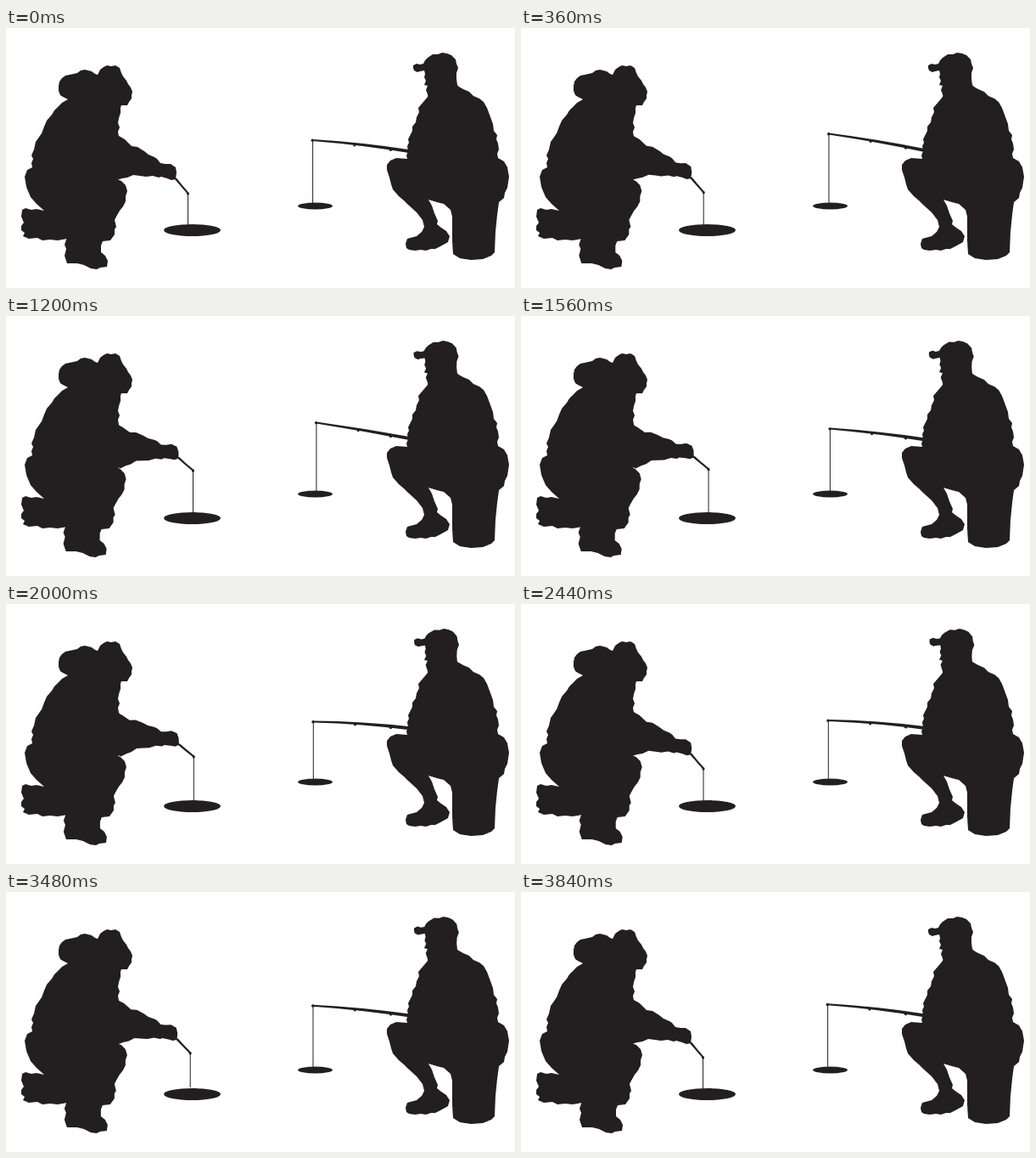
Animation, 600 px wide and 306 px high, one loop 3880 ms. Source, as an HTML page:

```html
<!DOCTYPE html>
<html lang="en">
<head>
<meta charset="utf-8">
<title>Ice fishing</title>
<style>
html, body { margin: 0; width: 100%; height: 100%; overflow: hidden; background: #fff; }
svg { display: block; width: 600px; height: 306px; fill: #231f20; }
.line { stroke: #231f20; stroke-width: 1; }
</style>
</head>
<body>
<svg viewBox="0 0 600 306">
  <ellipse cx="219.5" cy="238" rx="33.5" ry="7"/>
  <ellipse cx="364.5" cy="209.5" rx="20.5" ry="4"/>

  <!-- kneeling angler -->
  <polygon points="62,68 63,63 66,59 70,56 75,55 84,53 88,50 93,49 101,51 105,54 108,55 111,49 115,46 119,44 124,45 129,44 134,47 136,53 138,57 142,62 144,66 147,70 149,75 148,79 148,83 145,87 143,91 136,91 135,94 135,100 133,106 132,112 134,117 132,122 133,128 139,134 142,150 139,166 132,175 133,190 60,220 45,215 36,207 29,199 26,192 24,187 22,175 25,167 31,164 30,159 32,154 30,150 33,143 35,134 42,124 45,116 48,109 54,102 57,97 66,88 73,84 67,81 64,79 62,74"/>
  <polygon id="leg" points="70,190 131,178 136,180 141,185 143,192 141,198 141,204 138,210 134,215 130,222 128,226 130,234 128,237 128,243 123,250 114,251 112,256 112,264 117,268 120,274 119,281 111,282 107,284 100,283 92,279 84,277 72,277 69,268 71,260 69,255 72,246"/>
  <polygon points="45,215 36,213 30,214 23,212 19,214 18,222 21,229 18,233 18,238 22,241 20,245 27,248 37,247 43,250 52,249 61,250 72,248 85,250 94,230 75,195"/>
  <g id="arm">
    <polygon points="128,124 133,127 140,131 146,137 148,139 155,140 163,145 168,149 175,152 178,154 182,159 188,160 194,160 200,164 201,170 200,178 195,179 190,177 183,175 180,176 173,174 165,175 158,174 150,173 143,176 137,177 130,179 118,170 119,140"/>
    <path d="M198.5 177.5L201 176.5L207.6 184.8L215.5 194L214 195.6L206.3 186.6Z"/>
    <circle cx="214.5" cy="195" r="1.6"/>
  </g>
  <line id="lineA" class="line"/>

  <!-- seated angler -->
  <path id="rod"/>
  <circle id="ringA" r="1.5"/>
  <circle id="ringB" r="1.8"/>
  <circle id="tip" r="1.7"/>
  <line id="lineB" class="line"/>
  <polygon id="head" points="480,47 480,44 484,42 488,43 492,42 494,38 497,35 503,31 509,31 514,29 520,30 525,32 530,37 531,42 533,47 531,53 531,60 532,67 536,72 530,86 500,86 497,78 495,73 497,68 493,67 495,62 493,58 494,54 493,50 488,51 485,52 481,50"/>
  <polygon points="498,77 497,81 492,87 486,94 487,99 484,105 483,111 479,116 479,121 476,127 474,131 475,135 473,139 474,145 472,150 473,154 530,190 586,190 591,164 587,157 580,153 579,148 581,143 580,136 578,131 579,126 575,121 574,113 570,102 567,94 563,87 558,83 551,80 546,75 539,72 532,68 515,68"/>
  <polygon points="473,154 460,153 453,156 449,161 449,167 452,176 454,184 456,190 463,198 469,203 474,208 484,217 491,226 493,234 490,240 484,245 473,248 471,254 472,259 475,261 482,262 489,261 495,262 501,260 506,260 512,257 521,252 523,245 519,239 513,235 508,231 509,227 505,218 502,209 498,202 508,205 516,207 524,214 526,222 526,250 527,266 535,271 548,273 562,272 572,268 576,264 577,240 579,220 581,205 587,200 588,194 591,188 593,175 591,164 570,145 500,135"/>
</svg>
<script>
const LOOP = 3880, STEP = 40;
const times = [0, 680, 1200, 2000, 2440, 3120, LOOP];
const armAngle = [0, -2.7, -8.9, -10.4, -0.7, -6.8];
const lineEnd = [232, 232, 232, 232, 232, 228];
const legShift = [0, -1.3, -1.4, -1.1, -0.3, -0.3];
const headAngle = [0, 0.2, 1.6, 3.2, 4.2, 5];
const tipX = [361.3, 364.3, 365.6, 362, 362, 362];
const tipY = [132, 119, 125.5, 138.5, 137, 134.7];
const midY = [136.4, 129, 133.3, 140.4, 139.4, 138.2];
const buttY = [145, 143, 144, 146, 145.6, 145.3];

const $ = id => document.getElementById(id);
const put = (id, attrs) => {
  for (const k in attrs) $(id).setAttribute(k, attrs[k]);
};

// Monotone cubic through cyclic keys: smooth, never overshoots.
function at(keys, t) {
  const n = keys.length;
  const slope = i => {
    const k = (i + n) % n;
    return (keys[(k + 1) % n] - keys[k]) / (times[k + 1] - times[k]);
  };
  const tangent = i => {
    const a = slope(i - 1), b = slope(i);
    return a * b > 0 ? 2 * a * b / (a + b) : 0;
  };
  let i = 0;
  while (i < n - 1 && t >= times[i + 1]) i++;
  const span = times[i + 1] - times[i], u = (t - times[i]) / span;
  const from = keys[i], to = keys[(i + 1) % n];
  const ease = u * u * (3 - 2 * u);
  return from + (to - from) * ease
    + span * u * (1 - u) * ((1 - u) * tangent(i) - u * tangent(i + 1));
}

function drawLeft(t) {
  const deg = at(armAngle, t), a = deg * Math.PI / 180;
  const x = 135 + 79.5 * Math.cos(a) - 45 * Math.sin(a);
  const y = 150 + 79.5 * Math.sin(a) + 45 * Math.cos(a);
  put('arm', { transform: `rotate(${deg} 135 150)` });
  put('leg', { transform: `translate(${at(legShift, t)} 0)` });
  put('lineA', { x1: x, x2: x, y1: y, y2: at(lineEnd, t) });
}

function drawRight(t) {
  const x = at(tipX, t), y = at(tipY, t);
  const bx = 478, by = at(buttY, t) + 0.6;
  const mx = x + 49.5, my = at(midY, t);
  // Control point that makes the curve pass through the middle ring.
  const u = 49.5 / (bx - x), v = 1 - u;
  const cx = (x + bx) / 2;
  const cy = (my - v * v * y - u * u * by) / (2 * u * v);
  put('rod', {
    d: `M${x} ${y - 1}Q${cx} ${cy - 1.6} ${bx} ${by - 2}V${by + 2}Q${cx} ${cy + 1.6} ${x} ${y + 1}Z`
  });
  const w = (453.5 - x) / (bx - x);
  put('ringA', { cx: mx, cy: my + 1.5 });
  put('ringB', {
    cx: 453.5,
    cy: (1 - w) ** 2 * y + 2 * w * (1 - w) * cy + w * w * by + 1.5
  });
  put('tip', { cx: x, cy: y + 0.3 });
  put('lineB', { x1: x + 0.3, x2: x + 0.3, y1: y, y2: 207 });
  put('head', { transform: `rotate(${at(headAngle, t)} 515 66)` });
}

const start = performance.now();
function frame(now) {
  const t = Math.floor(Math.max(0, now - start) % LOOP / STEP) * STEP;
  drawLeft(t);
  drawRight(t);
  requestAnimationFrame(frame);
}
frame(start);
</script>
</body>
</html>
```
